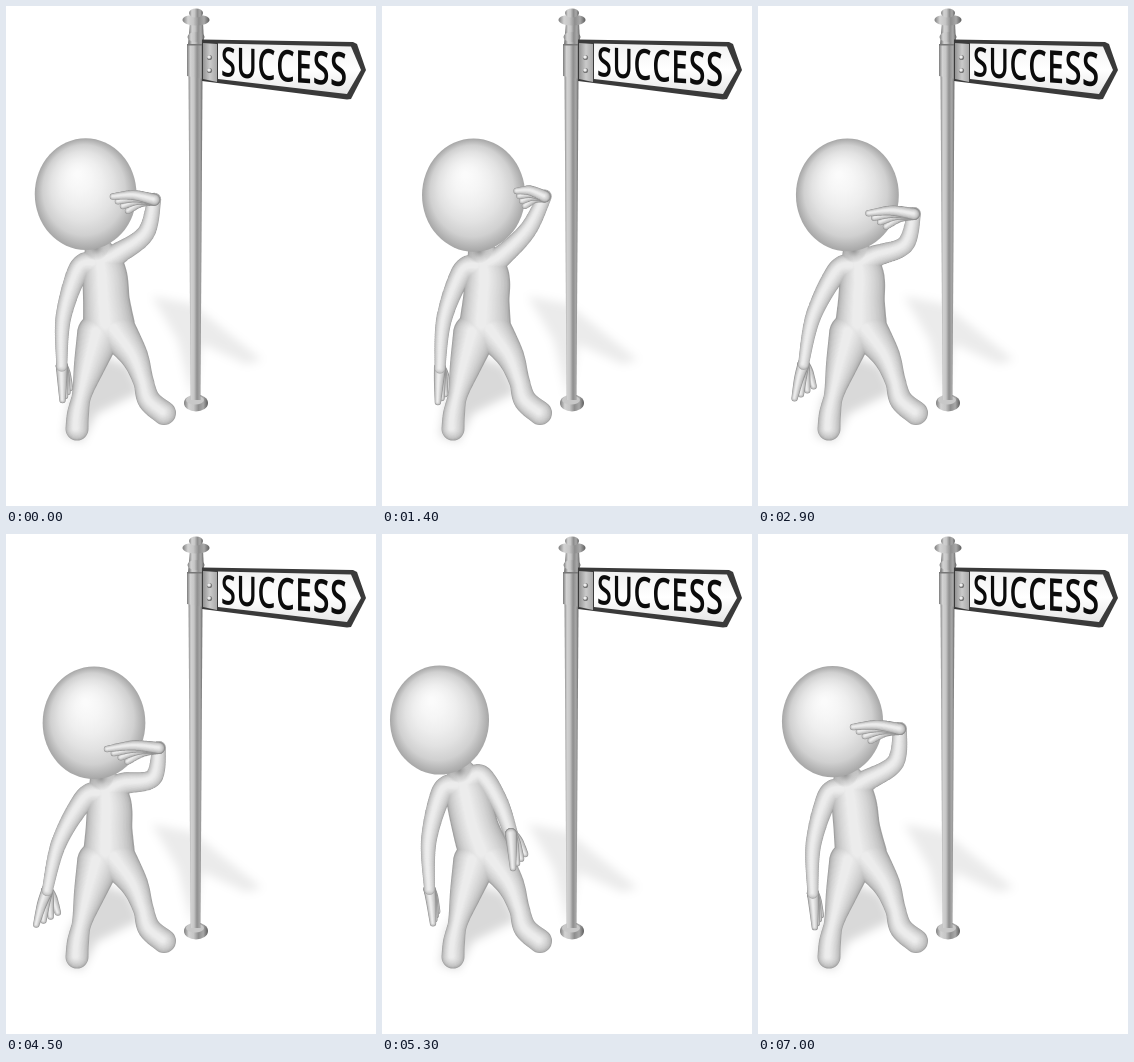
Animation, 370 px wide and 500 px high, one loop 8000 ms. Source, as an HTML page with a canvas:

```html
<!DOCTYPE html>
<html>
<head>
<meta charset="utf-8">
<style>
  html, body { margin: 0; width: 100%; height: 100%; overflow: hidden; background: #fff; }
  canvas { display: block; }
</style>
</head>
<body>
<canvas id="stage" width="370" height="500"></canvas>
<script>
const ctx = document.getElementById('stage').getContext('2d');
const mix = (a, b, t) => a.map((v, i) => v + (b[i] - v) * t);

// Pose: head x, swing of the hanging arm in degrees, elbow bulge, wrist and fingertip of the other arm
const left    = [74.5, 9, 14, 142, 195, 95, 193];
const far     = [93.5, 13.5, 5, 165, 190, 139, 184];
const lowered = [88, 22, 17, 153, 214, 101, 215];
const relaxed = [57.5, 7.5, -4, 129, 300, 131, 334];
const reach   = [63, 9.5, -7, 166, 241, 165, 284];
const scan = t => mix(left, far, t);
const home = scan(.27), peer = scan(.9), turn = mix(far, lowered, .75);

const timeline = [
  [0, home], [900, home], [1000, scan(.65)], [1400, peer], [2300, peer],
  [2400, far], [2900, turn], [4400, turn], [4500, lowered], [5300, relaxed],
  [6200, relaxed], [6500, reach], [7000, left], [7900, left], [8000, home]
];

function poseAt(time) {
  const i = timeline.findIndex(key => key[0] > time);
  const [t0, a] = timeline[i - 1], [t1, b] = timeline[i];
  return mix(a, b, (time - t0) / (t1 - t0));
}

// Dense [x, y, radius] dots on a smooth curve through the given ones
function curve(pts) {
  const dots = [];
  for (let i = 0; i < pts.length - 1; i++) {
    const b = pts[i], c = pts[i + 1], a = pts[i - 1] || b, d = pts[i + 2] || c;
    for (let t = 0; t <= 1; t += 1 / 24) {
      dots.push(b.map((v, j) => v + .5 * t * (c[j] - a[j] +
        t * (2 * a[j] - 5 * v + 4 * c[j] - d[j] + t * (3 * (v - c[j]) + d[j] - a[j])))));
    }
  }
  return dots;
}

// Rounded limbs, shaded from a grey rim to a light core
function solid(limbs, rim = 160, layers = 14) {
  const dots = limbs.flatMap(curve);
  for (let k = 0; k <= layers; k++) {
    const f = k / layers, tone = rim + (236 - rim) * Math.sqrt(f);
    ctx.fillStyle = `rgb(${tone},${tone},${tone})`;
    ctx.beginPath();
    for (const [x, y, r] of dots) {
      const cx = x - r * .14 * f, cy = y - r * .1 * f, R = r * (1 - .8 * f);
      ctx.moveTo(cx + R, cy);
      ctx.arc(cx, cy, R, 0, 7);
    }
    ctx.fill();
  }
}

// Point halfway along a limb, pushed sideways
function joint([ax, ay], [bx, by], bulge) {
  const dx = bx - ax, dy = by - ay, k = bulge / Math.hypot(dx, dy);
  return [(ax + bx) / 2 - dy * k, (ay + by) / 2 + dx * k];
}

function hand([wx, wy], [tx, ty], [sx, sy]) {
  for (let i = 3; i >= 0; i--) {
    const x = tx + sx * i, y = ty + sy * i;
    solid([[[wx, wy, 6], [(wx + x) / 2, (wy + y) / 2 - 3, 5], [x, y, 3.2]]], 145, 6);
  }
}

function poly(fill, ...pts) {
  ctx.fillStyle = fill;
  ctx.beginPath();
  pts.forEach(p => ctx.lineTo(...p));
  ctx.fill();
}

function ellipse(fill, ...shape) {
  ctx.fillStyle = fill;
  ctx.beginPath();
  ctx.ellipse(...shape, 0, 0, 7);
  ctx.fill();
}

function ramp(g, ...colors) {
  colors.forEach((c, i) => g.addColorStop(i / (colors.length - 1), c));
  return g;
}

const metal = (x0, x1) => ramp(ctx.createLinearGradient(x0, 0, x1, 0),
  '#7c7c7c', '#d2d2d2', '#c6c6c6', '#8e8e8e', '#a8a8a8', '#5c5c5c');
const knob = (y, rx, ry) => ellipse(metal(190 - rx, 190 + rx), 190, y, rx, ry);

function shadows() {
  ctx.save();
  ctx.filter = 'blur(5px)';
  poly('rgba(0,0,0,.15)', [58, 430], [76, 436], [90, 408], [134, 386], [122, 360], [95, 350], [64, 395]);
  poly('rgba(0,0,0,.08)', [146, 290], [186, 298], [256, 354], [240, 358], [196, 338], [186, 392], [172, 335]);
  ctx.restore();
}

function post() {
  knob(397, 12, 8.5);
  ellipse('#c8c8c8', 189, 394, 9, 4.5);
  poly(metal(182, 197), [182.5, 68], [196.5, 68], [194.5, 394], [184.5, 394]);
  poly(metal(181, 198), [181, 38], [197, 38], [197, 73], [181, 70]);
  poly(metal(183, 198), [184, 16], [197, 16], [198, 38], [182, 38]);
  knob(31, 8.5, 5);
  knob(14, 13.5, 5.5);
  knob(7, 7, 4.5);
  poly('#777', [181, 38], [197, 38], [197, 39.5], [181, 39.5]);
}

function sign() {
  poly('#3a3a3a', [196, 33.5], [347, 36], [351, 38], [360, 64], [345, 93], [341, 93.5], [196, 75]);
  poly(ramp(ctx.createLinearGradient(0, 39, 0, 88), '#f2f2f2', '#fff', '#e6e6e6'),
    [212, 37.5], [345, 40.5], [355, 64], [341, 88], [212, 73]);
  poly(ramp(ctx.createLinearGradient(196, 0, 212, 0), '#8c8c8c', '#cacaca', '#a4a4a4'),
    [197, 37], [211, 38], [211, 76], [197, 73]);
  for (const y of [51, 64]) {
    ellipse('#777', 203.5, y + .5, 2.6, 2.6);
    ellipse('#eee', 203, y, 1.8, 1.8);
  }
  // Lettering in perspective: it grows and sinks towards the right
  ctx.fillStyle = '#0b0b0b';
  ctx.font = '600 42px "Open Sans", sans-serif';
  let x = 215;
  for (const letter of 'SUCCESS') {
    const d = x - 215, size = .97 + d * .0014;
    ctx.save();
    ctx.transform(size * .66, .05, 0, size, x, 70 + d * .085);
    ctx.fillText(letter, 0, 0);
    ctx.restore();
    x += ctx.measureText(letter).width * size * .66 + .7;
  }
}

function figure([hx, swing, bulge, wx, wy, tx, ty]) {
  const lean = hx - 57;
  const hy = 186 + lean * .09, rx = 49.5 + lean * .06;
  const nx = 77 + lean * .58, ny = hy + 50 + lean * .16;
  const chest = [nx + 8, ny + 23, 21.5], pelvis = [103, 320, 26];

  const angle = swing * Math.PI / 180;
  const shoulderL = [nx - 17, ny + 22];
  const wristL = [shoulderL[0] - 98 * Math.sin(angle), shoulderL[1] + 98 * Math.cos(angle)];
  const shoulderR = [nx + 22, ny + 6], wristR = [wx, wy];

  hand(wristL, [wristL[0] + 11 - swing, wristL[1] + 34], [.4 * (swing - 4), -4]);
  solid([
    [[nx, ny - 6, 10], chest, [(chest[0] + pelvis[0]) / 2, 296, 23.5], pelvis],
    [[93, 328, 22], [84, 358, 16], [76, 388, 10], [72, 408, 11], [71, 423, 11.5]],
    [[110, 324, 20], [128, 350, 14], [137, 374, 10.5], [143, 394, 11.5], [158, 407, 12]],
    [[nx - 1, ny + 16, 13], [...shoulderL, 11], [...joint(shoulderL, wristL, 7), 8], [...wristL, 5.5]],
    [[nx + 6, ny + 15, 14], [...shoulderR, 11], [...joint(shoulderR, wristR, bulge), 9], [...wristR, 7]]
  ]);
  ellipse(ramp(ctx.createRadialGradient(nx, ny, 1, nx, ny, 13),
    'rgba(70,70,70,.5)', 'rgba(70,70,70,.2)', 'rgba(70,70,70,0)'), nx, ny, 13, 13);

  ctx.save();
  ctx.translate(hx, hy);
  ctx.scale(rx, rx + 5);
  ellipse(ramp(ctx.createRadialGradient(-.16, -.36, .05, 0, 0, 1),
    '#fbfbfb', '#f6f6f6', '#eee', '#e2e2e2', '#d0d0d0', '#a6a6a6'), 0, 0, 1, 1);
  ctx.restore();

  // Each finger is a little shorter and further to the side than the one before
  const dx = tx - wx, dy = ty - wy, side = 4.3 / Math.hypot(dx, dy);
  hand(wristR, [tx, ty], [dy * side - dx * .13, -dx * side - dy * .13]);
}

function draw(now) {
  const time = Math.floor(now % 8000 / 100) * 100;
  ctx.fillStyle = '#fff';
  ctx.fillRect(0, 0, 370, 500);
  shadows();
  post();
  sign();
  figure(poseAt(time));
}

let start;
function tick(now) {
  start ??= now;
  draw(now - start);
  requestAnimationFrame(tick);
}
requestAnimationFrame(tick);
</script>
</body>
</html>
```
